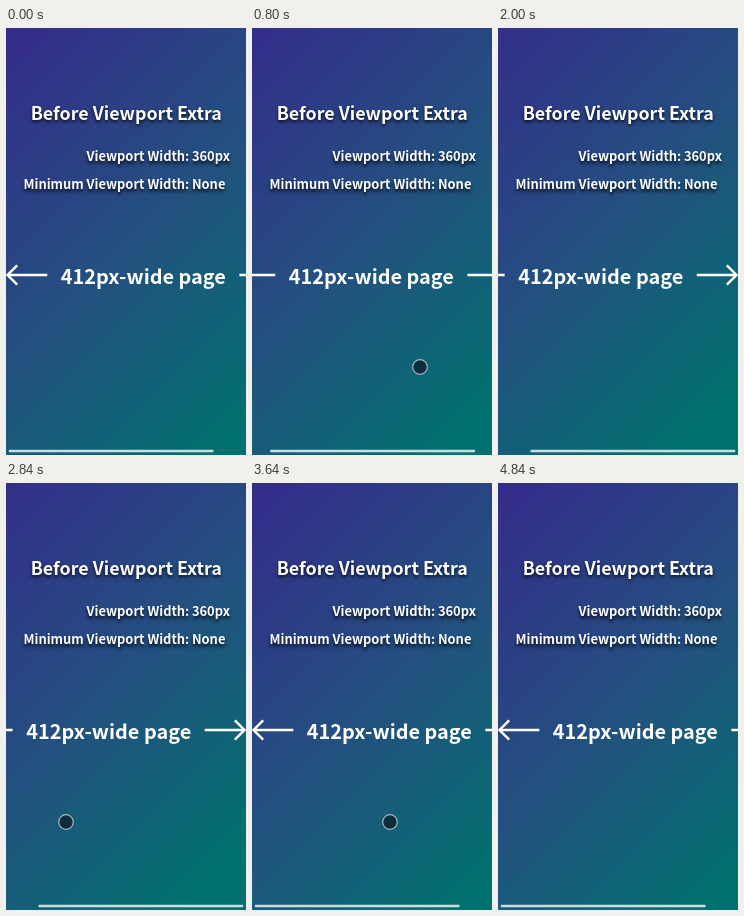
Animation, 240 px wide and 427 px high, one loop 4880 ms. Source, as an HTML page:

```html
<!DOCTYPE html>
<html lang="en">
<head>
<meta charset="utf-8">
<title>Before Viewport Extra</title>
<style>
  html, body { margin: 0; width: 100%; height: 100%; overflow: hidden; background: #25517f; }
  #stage { position: relative; width: 240px; height: 427px; overflow: hidden; }
  #page {
    position: absolute; left: 0; top: 0; width: 274.67px; height: 427px;
    background: linear-gradient(135deg, #352b8b, #23517f 50%, #00716e 91%);
  }
  svg { position: absolute; left: 0; top: 0; display: block; }
  text { font-family: "Noto Sans CJK JP", "Noto Sans CJK", "Noto Sans", sans-serif; font-weight: 700; fill: #fff; }
  .arrow { fill: none; stroke: #fff; stroke-width: 2.4; }
  .overlay text { text-shadow: 0 2.6px 3.4px rgba(0, 0, 0, .8); }
  .title { font-size: 17.88px; text-anchor: middle; }
  .stat { font-size: 12.9px; }
  .label { text-anchor: end; }
  .wide { font-size: 19.9px; text-anchor: middle; }
</style>
</head>
<body>
<div id="stage">
  <div id="page">
    <svg width="274.67" height="427">
      <path class="arrow" d="M41.3 247H1.5M11.2 237.3L1.5 247L11.2 256.7"/>
      <path class="arrow" d="M233.4 247H273.2M263.5 237.3L273.2 247L263.5 256.7"/>
      <text class="wide" x="137.4" y="255.5">412px-wide page</text>
    </svg>
  </div>
  <svg class="overlay" width="240" height="427">
    <text class="title" x="120.3" y="91.8">Before Viewport Extra</text>
    <text class="stat label" x="183.3" y="133">Viewport Width:</text>
    <text class="stat" x="185.9" y="133">360px</text>
    <text class="stat label" x="183.3" y="161">Minimum Viewport Width:</text>
    <text class="stat" x="185.9" y="161">None</text>
    <rect id="bar" x="2.7" y="421.7" width="205" height="2.67" rx="1" fill="#fff" fill-opacity=".78"/>
    <circle id="touch" cy="339" r="7.3" fill="#0f2c3d" stroke="#a3b9c6" stroke-width="1.2"/>
  </svg>
</div>
<script>
  const LOOP = 4880, STEP = 40;
  const RANGE = 274.67 - 240, BAR_RANGE = 29.6;
  const SPEED = 6 / STEP, REACH = 120;
  // Each swipe: press, drag start, release (ms), start x, direction
  const swipes = [
    { press: 320, drag: 720, release: 1920, from: 180, dir: -1 },
    { press: 2720, drag: 3120, release: 4320, from: 60, dir: 1 }
  ];
  const [page, bar, touch] = ['page', 'bar', 'touch'].map(id => document.getElementById(id));
  const clamp = (v, lo, hi) => Math.min(hi, Math.max(lo, v));
  const dragged = (s, t) => clamp((t - s.drag) * SPEED, 0, REACH);

  function draw(t) {
    // The page runs one step ahead of the touch marker
    const scroll = swipes.reduce(
      (pos, s) => clamp(pos - s.dir * dragged(s, t + STEP), 0, RANGE), 0);
    page.style.transform = `translateX(${-scroll}px)`;
    bar.setAttribute('x', 2.7 + scroll / RANGE * BAR_RANGE);

    const s = swipes.find(s => t >= s.press && t < s.release);
    touch.style.display = s ? '' : 'none';
    if (s) touch.setAttribute('cx', s.from + s.dir * dragged(s, t));
  }

  function tick() {
    draw(Math.floor(performance.now() % LOOP / STEP) * STEP);
    requestAnimationFrame(tick);
  }
  tick();
</script>
</body>
</html>
```
